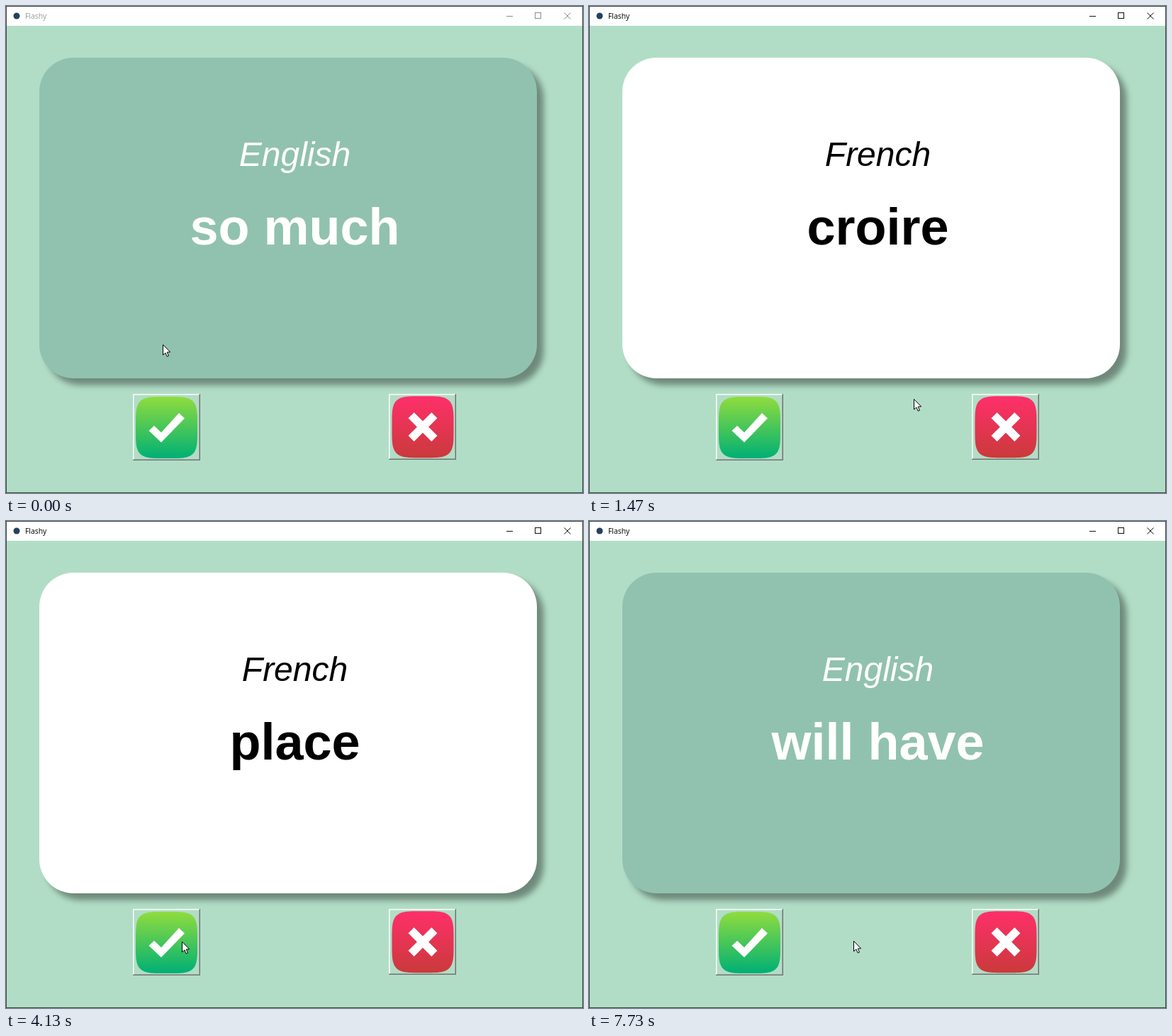
An HTML page with a canvas for the animation above (8 s loop, 814x688 px).

```html
<!DOCTYPE html>
<html lang="en">
<head>
<meta charset="utf-8">
<title>Flashy</title>
<style>
  html, body { margin: 0; width: 100%; height: 100%; overflow: hidden; background: #b1ddc6; }
  canvas { display: block; }
</style>
</head>
<body>
<canvas id="stage" width="814" height="688"></canvas>
<script>
const ctx = document.getElementById('stage').getContext('2d');
const LOOP = 8000;
const MINT = '#b1ddc6';

// Cards: [start time, language, word, is back side]
const cards = [
  [0, 'English', 'so much', true],
  [670, 'French', 'croire', false],
  [2870, 'French', 'place', false],
  [4730, 'French', 'aura', false],
  [7730, 'English', 'will have', true],
];

// Pointer moves: [start, end, x, y]
const home = [221, 478];
const moves = [
  [0, 470, 578, 571],
  [800, 1070, 466, 556],
  [1200, 1530, 457, 555],
  [2400, 2470, 460, 556],
  [2470, 2670, 574, 586],
  [2870, 3130, 425, 590],
  [3930, 4130, 248, 594],
  [4200, 4330, 239, 594],
  [4530, 4600, 241, 594],
  [6000, 6200, 373, 593],
];

const wrongPresses = [[530, 670], [2730, 2870]];
const rightPresses = [[4670, 4730]];
const activeFrom = 530;

const within = (t, spans) => spans.some(([a, b]) => t >= a && t < b);
const ease = p => p * p * (3 - 2 * p);

function tick(t) {
  return Math.round(Math.floor((t + 4) * 0.015) * 100 / 15) * 10;
}

function pointerAt(t) {
  let [x, y] = home;
  for (const [start, end, toX, toY] of moves) {
    if (t <= start) break;
    const p = ease(Math.min(1, (t - start) / (end - start)));
    x += (toX - x) * p;
    y += (toY - y) * p;
  }
  return [Math.round(x), Math.round(y)];
}

function rect(x, y, w, h, color) {
  ctx.fillStyle = color;
  ctx.fillRect(x, y, w, h);
}

function polygon(points) {
  ctx.beginPath();
  points.forEach(([x, y]) => ctx.lineTo(x, y));
  ctx.closePath();
}

function text(str, x, y, font, color, align) {
  ctx.font = font;
  ctx.fillStyle = color;
  ctx.textAlign = align;
  ctx.fillText(str, x, y);
}

function line(x1, y1, x2, y2) {
  ctx.beginPath();
  ctx.moveTo(x1, y1);
  ctx.lineTo(x2, y2);
  ctx.stroke();
}

function drawTitleBar(active) {
  rect(0, 0, 814, 28, '#fff');
  ctx.fillStyle = '#24415f';
  ctx.beginPath();
  ctx.arc(15, 14, 4.5, 0, Math.PI * 2);
  ctx.fill();
  const ink = active ? '#000' : '#999';
  text('Flashy', 27, 18, '10.4px "Open Sans", "Noto Sans", sans-serif', ink, 'left');
  ctx.strokeStyle = active ? '#111' : '#8c8c8c';
  ctx.lineWidth = 1;
  line(706, 14.5, 715, 14.5);
  ctx.strokeRect(746.5, 9.5, 8, 8);
  line(787.5, 9.5, 796.5, 18.5);
  line(796.5, 9.5, 787.5, 18.5);
}

function drawCard(language, word, back) {
  ctx.save();
  ctx.shadowColor = 'rgba(0, 0, 0, 0.38)';
  ctx.shadowBlur = 9;
  ctx.shadowOffsetX = ctx.shadowOffsetY = 9.5;
  ctx.fillStyle = back ? '#91c2af' : '#fff';
  ctx.beginPath();
  ctx.roundRect(47, 73, 702, 453, 48);
  ctx.fill();
  ctx.restore();
  const ink = back ? '#fff' : '#000';
  const family = '"Liberation Sans", Arial, sans-serif';
  text(language, 407.5, 225.5, `italic 48px ${family}`, ink, 'center');
  text(word, 407.5, 337, `bold 72px ${family}`, ink, 'center');
}

function squircle(cx, cy, r) {
  const bend = v => Math.sign(v) * Math.abs(v) ** (2 / 4.4);
  const points = [];
  for (let i = 0; i < 180; i++) {
    const a = i * Math.PI / 90;
    points.push([cx + r * bend(Math.cos(a)), cy + r * bend(Math.sin(a))]);
  }
  polygon(points);
}

function bevel(x, y, w, h, pressed) {
  const light = pressed ? '#777d7a' : '#f7fbf9';
  const dark = pressed ? '#f7fbf9' : '#6c716e';
  rect(x, y, w, h, dark);
  rect(x, y, w - 1, h - 1, light);
  rect(x + 1, y + 1, w - 2, h - 2, pressed ? '#e3e6e4' : '#9ea5a1');
  rect(x + 1, y + 1, w - 3, h - 3, pressed ? '#8d9591' : '#dceee5');
  rect(x + 2, y + 2, w - 4, h - 4, MINT);
}

function drawButton(x, w, h, cx, cy, colors, pressed, drawMark) {
  bevel(x, 548, w, h, pressed);
  ctx.save();
  ctx.translate(cx + pressed, cy + pressed);
  const fill = ctx.createLinearGradient(0, -43, 0, 43);
  colors.forEach((c, i) => fill.addColorStop(i, c));
  ctx.fillStyle = fill;
  squircle(0, 0, 43.5);
  ctx.fill();
  drawMark();
  ctx.restore();
}

function checkMark() {
  ctx.fillStyle = '#fff';
  polygon([[-25, 4.5], [-17.5, -2.5], [-7.5, 7], [17.5, -20.5], [25.5, -13], [-7.5, 21]]);
  ctx.fill();
}

function crossMark() {
  ctx.strokeStyle = '#fff';
  ctx.lineWidth = 11.5;
  const d = 16.4;
  line(-d, -d, d, d);
  line(d, -d, -d, d);
}

function drawPointer(x, y) {
  ctx.save();
  ctx.translate(x + 0.5, y + 0.5);
  polygon([[0, 0], [0, 14.5], [3.4, 11.5], [5.7, 16.7], [8, 15.7], [5.7, 10.6], [10.2, 10.4]]);
  ctx.fillStyle = '#fff';
  ctx.fill();
  ctx.strokeStyle = '#000';
  ctx.lineWidth = 1;
  ctx.stroke();
  ctx.restore();
}

function draw(t) {
  rect(0, 0, 814, 688, MINT);
  drawTitleBar(t >= activeFrom);
  const [, language, word, back] = cards.filter(c => c[0] <= t).pop();
  drawCard(language, word, back);
  drawButton(179, 95, 94, 226.5, 595.5, ['#8fdc3e', '#00b074'],
    within(t, rightPresses), checkMark);
  drawButton(540, 95, 93, 588, 594.7, ['#ff2f6a', '#ca3a3b'],
    within(t, wrongPresses), crossMark);
  ctx.strokeStyle = '#3e4a45';
  ctx.lineWidth = 1;
  ctx.strokeRect(0.5, 0.5, 813, 687);
  drawPointer(...pointerAt(t));
}

function frame() {
  draw(tick(performance.now() % LOOP));
  requestAnimationFrame(frame);
}
frame();
</script>
</body>
</html>
```
